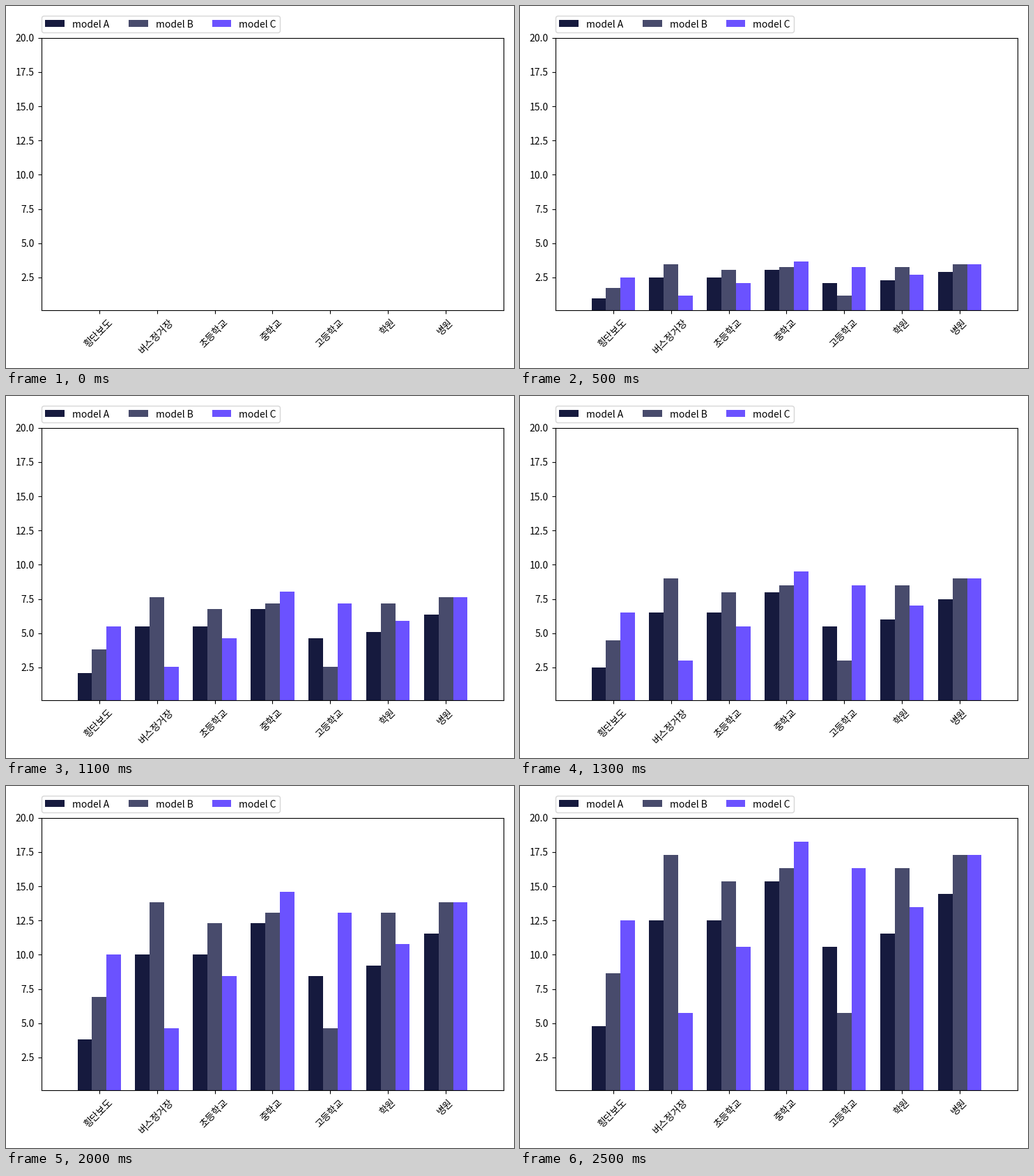
Recreate the animation shown at these times as a matplotlib script. Size 729x520 px, loop 2.6 s.

```python
import matplotlib.pyplot as plt
from matplotlib.animation import FuncAnimation
from matplotlib.patches import FancyBboxPatch, Rectangle

plt.rcParams["font.family"] = "Noto Sans CJK JP"
plt.rcParams["font.size"] = 10

WIDTH, HEIGHT, DPI = 729, 520, 100
STEPS, INTERVAL = 26, 100
LEFT, TOP, RIGHT, BOTTOM = 50.7, 45.8, 714.2, 437.2
BAR_WIDTH = 0.25
EM = 10 * DPI / 72

PLACES = ["횡단보도", "버스정거장", "초등학교", "중학교", "고등학교", "학원", "병원"]
SERIES = [
    ("model A", "#161a3e", [5, 13, 13, 16, 11, 12, 15]),
    ("model B", "#484b6c", [9, 18, 16, 17, 6, 17, 18]),
    ("model C", "#6b52ff", [13, 6, 11, 19, 17, 14, 18]),
]

fig = plt.figure(figsize=(WIDTH / DPI, HEIGHT / DPI), dpi=DPI, facecolor="white")

ax = fig.add_axes([LEFT / WIDTH, 1 - BOTTOM / HEIGHT,
                   (RIGHT - LEFT) / WIDTH, (BOTTOM - TOP) / HEIGHT])
ax.set_xlim(0, 8)
ax.set_ylim(0.1, 20)
ax.set_xticks(range(1, 8), [""] * 7)
ax.set_yticks([2.5 * k for k in range(1, 9)])

# Overlay in pixel units, origin at the top left, for legend and place names
overlay = fig.add_axes([0, 0, 1, 1])
overlay.set_xlim(0, WIDTH)
overlay.set_ylim(HEIGHT, 0)
overlay.axis("off")


def draw_legend():
    overlay.add_patch(FancyBboxPatch(
        (51, 14), 342, 24, boxstyle=f"round,pad=0,rounding_size={0.2 * EM}",
        facecolor="white", edgecolor="0.8", linewidth=1, alpha=0.8, snap=True))
    for k, (name, color, _) in enumerate(SERIES):
        x = 56.1 + 119.75 * k
        overlay.add_patch(Rectangle((x, 20), 2 * EM, 0.7 * EM,
                                    color=color, linewidth=0))
        overlay.text(x + 2.8 * EM, 31, name, va="baseline")


def draw_place_names():
    step = (RIGHT - LEFT) / 8
    for k, place in enumerate(PLACES, start=1):
        overlay.text(LEFT + k * step - 0.8, 447.7, place,
                     rotation=45, ha="center", va="top")


draw_legend()
draw_place_names()

bars = []
for k, (_, color, totals) in enumerate(SERIES):
    xs = [i + (k - 1) * BAR_WIDTH for i in range(1, 8)]
    group = ax.bar(xs, [0] * 7, BAR_WIDTH, color=color)
    bars += zip(group, totals)


def update(step):
    for bar, total in bars:
        bar.set_height(total * step / STEPS)
    return [bar for bar, _ in bars]


anim = FuncAnimation(fig, update, frames=STEPS, interval=INTERVAL,
                     repeat=True, repeat_delay=0, blit=False)
plt.show()
```
